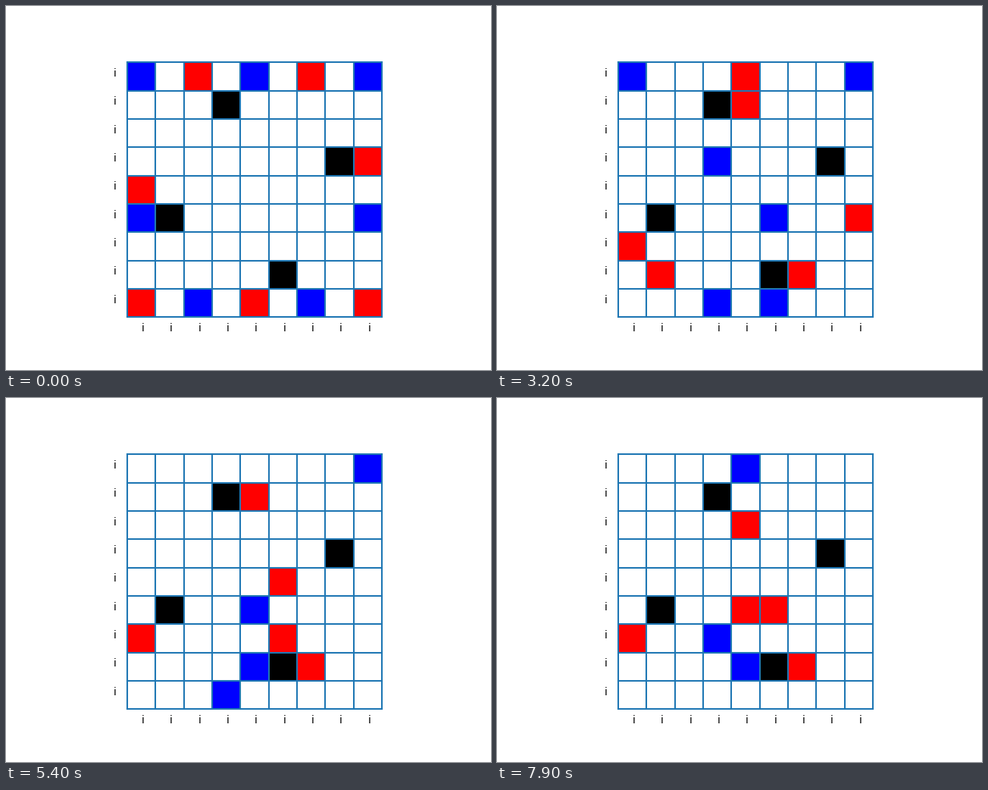
Animation of 640x480 px, one loop 8000 ms. Source, as a matplotlib script:

```python
import matplotlib.pyplot as plt
from matplotlib.animation import FuncAnimation
from matplotlib.patches import Rectangle

SIZE = 9
FRAMES = 80
LINE = "#1f77b4"
STEP = {"U": (-1, 0), "D": (1, 0), "L": (0, -1), "R": (0, 1)}

# Cells are (row, column), counted from the top left.
WALLS = [(1, 3), (3, 7), (5, 1), (7, 5)]
BLUE = [(0, 0), (0, 4), (0, 8), (5, 0), (5, 8), (8, 2), (8, 6)]
RED = [(0, 2), (0, 6), (3, 8), (4, 0), (8, 0), (8, 4), (8, 8)]

# Each walk is a start cell (row, column) and its steps; the sides take turns.
BLUE_WALKS = ("82R 86L 58LD 50DR 67L 61RU 66LU 52UUR 33UD 33RU 00DDRRR "
              "85LU 23R 55L 54LUR 08LLLD 15UL 83UUUD")
RED_WALKS = ("38D 88UU 48D 40DD 68D 02R 06L 03R 05DL 80RU 78LL 71RR 58LLDL "
             "14R 15D 04D 25DD 65LU 14DDR 45D 35U 55UD 25LDU")


def moves(walks):
    for walk in walks.split():
        cell = int(walk[0]), int(walk[1])
        for key in walk[2:]:
            nxt = cell[0] + STEP[key][0], cell[1] + STEP[key][1]
            yield cell, nxt
            cell = nxt


def captured(board, cell):
    """A piece falls when two or more enemies stand next to it."""
    row, col = cell
    near = [board.get((row + dr, col + dc)) for dr, dc in STEP.values()]
    return sum(c is not None and c != board[cell] for c in near) >= 2


def play():
    board = {cell: "blue" for cell in BLUE}
    board.update({cell: "red" for cell in RED})
    turns = moves(BLUE_WALKS), moves(RED_WALKS)
    states = [dict(board)]
    for i in range(FRAMES - 1):
        start, end = next(turns[i % 2])
        board[end] = board.pop(start)
        for cell in [c for c in board if captured(board, c)]:
            del board[cell]
        states.append(dict(board))
    return states


states = play()

fig, ax = plt.subplots(figsize=(6.4, 4.8), dpi=100)
ax.set_aspect("equal")
ax.set_xlim(-0.45, SIZE + 0.45)
ax.set_ylim(SIZE + 0.45, -0.45)
ax.axis("off")

cells = {}
for r in range(SIZE):
    for c in range(SIZE):
        color = "black" if (r, c) in WALLS else "white"
        cells[r, c] = ax.add_patch(Rectangle((c, r), 1, 1, fc=color, lw=0))

for k in range(SIZE + 1):
    ax.plot([0, SIZE], [k, k], color=LINE, lw=1.5)
    ax.plot([k, k], [0, SIZE], color=LINE, lw=1.5)

for k in range(SIZE):
    ax.text(k + 0.5, SIZE + 0.5, "i")
    ax.text(-0.5, k + 0.5, "i")


def draw(frame):
    for cell, patch in cells.items():
        if cell not in WALLS:
            patch.set_facecolor(states[frame].get(cell, "white"))
    return list(cells.values())


anim = FuncAnimation(fig, draw, frames=FRAMES, interval=100, repeat=True,
                     repeat_delay=0, blit=False)
plt.show()
```
